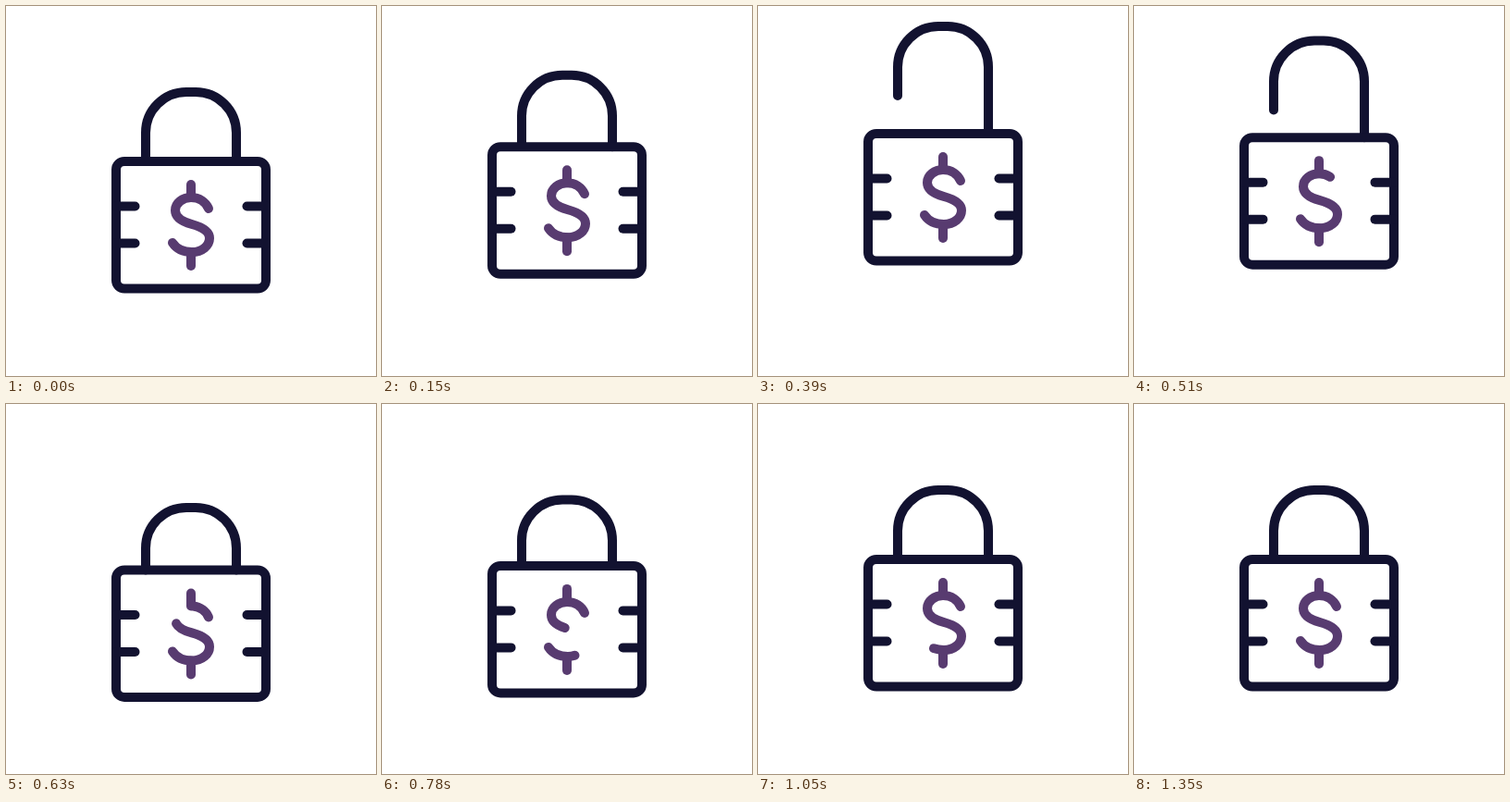
Animation of 400 by 400 pixels, one loop 1.41 s. Source, as an HTML page with a canvas:

```html
<!DOCTYPE html>
<html lang="en">
<head>
<meta charset="utf-8">
<title>Padlock</title>
<style>
  html, body { margin: 0; width: 100%; height: 100%; overflow: hidden; background: #fff; }
  canvas { display: block; width: 400px; height: 400px; }
</style>
</head>
<body>
<canvas id="stage" width="400" height="400"></canvas>
<script>
const ctx = document.getElementById('stage').getContext('2d');
const LOOP = 1410;
const NAVY = '#121230';
const PURPLE = '#583b70';
const BODY_TOP = 168;

const dollarCurve = new Path2D(
  'M219 219C216 212 209 207 200 207S183 213 183 221 190 233 201 236 ' +
  '220 243 220 251 212 266 201 266 184 262 180 256');
const CURVE_LENGTH = 152;

const progress = (t, from, to) => Math.min(1, Math.max(0, (t - from) / (to - from)));
const ease = (t, from, to) => (1 - Math.cos(Math.PI * progress(t, from, to))) / 2;
const easeOut = x => 1 - (1 - x ** 1.5) ** 3.25;

// The lock dips, jumps up, drops back into the dip and settles.
function bodyOffset(t) {
  const dip = ease(t, 0, 60) - ease(t, 660, 900);
  const jump = ease(t, 60, 208) - ease(t, 474, 660);
  return 14 * dip - 44 * jump;
}

// The shackle springs open, then snaps shut a little too deep.
function shackleOffset(t) {
  const shut = ease(t, 464, 610);
  const open = ease(t, 120, 320) - shut;
  return 7.5 * (shut - ease(t, 660, 900)) - 41 * open;
}

function line(x0, y0, x1, y1) {
  ctx.beginPath();
  ctx.moveTo(x0, y0);
  ctx.lineTo(x1, y1);
  ctx.stroke();
}

function drawShackle(offset) {
  const shoulder = 137 + offset;
  ctx.beginPath();
  ctx.moveTo(151, BODY_TOP + Math.min(0, offset));
  ctx.arc(195, shoulder, 44, Math.PI, Math.PI * 1.5);
  ctx.arc(205, shoulder, 44, Math.PI * 1.5, Math.PI * 2);
  ctx.lineTo(249, BODY_TOP);
  ctx.stroke();
}

function drawBody() {
  ctx.beginPath();
  ctx.roundRect(119, BODY_TOP, 162, 137.5, 9);
  ctx.stroke();
  for (const y of [216.5, 256.5]) {
    line(119, y, 139.5, y);
    line(260.5, y, 281, y);
  }
}

// One dash as long as the curve slides along it, so only a part shows.
function strokeCurve(shift) {
  ctx.setLineDash([CURVE_LENGTH, CURVE_LENGTH]);
  ctx.lineDashOffset = shift * CURVE_LENGTH;
  ctx.stroke(dollarCurve);
  ctx.setLineDash([]);
}

function drawDollar(t) {
  const drawn = easeOut(progress(t, 525, 1350));
  const erased = ease(t, 420, 945);
  line(200, 193, 200, 207);
  line(200, 266, 200, 281);
  if (drawn > 0) strokeCurve(1 - drawn);
  if (erased < 1) strokeCurve(2 - erased);
}

function render(t) {
  ctx.fillStyle = '#fff';
  ctx.fillRect(0, 0, 400, 400);
  ctx.save();
  ctx.translate(0, bodyOffset(t));
  ctx.lineCap = ctx.lineJoin = 'round';
  ctx.lineWidth = 10;
  ctx.strokeStyle = NAVY;
  drawShackle(shackleOffset(t));
  drawBody();
  ctx.strokeStyle = PURPLE;
  drawDollar(t);
  ctx.restore();
}

const start = performance.now();
function tick() {
  render((performance.now() - start) % LOOP);
  requestAnimationFrame(tick);
}
tick();
</script>
</body>
</html>
```
